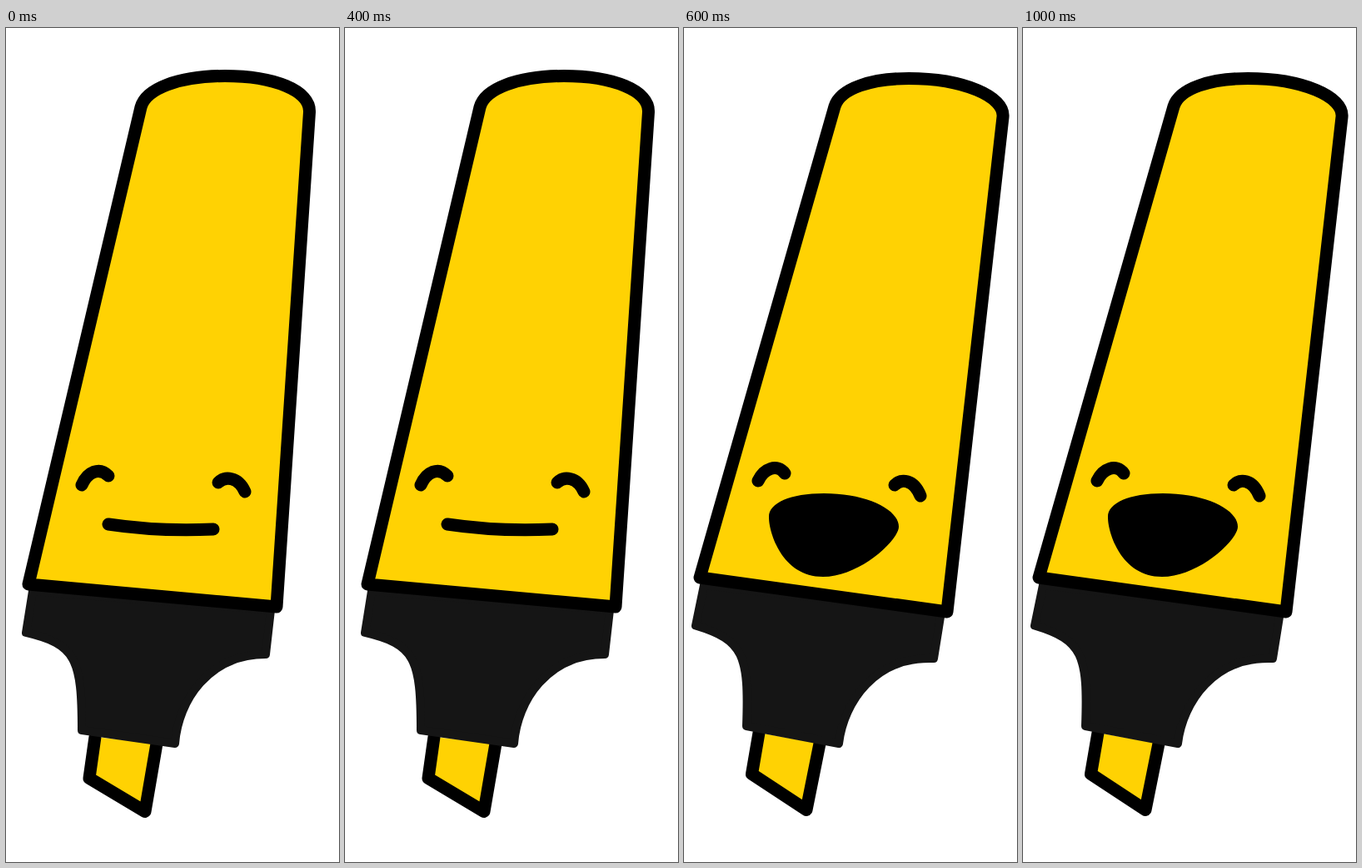
Animation, 400 px wide and 1000 px high, one loop 1200 ms. Source, as an HTML page:

```html
<!DOCTYPE html>
<html lang="en">
<head>
<meta charset="utf-8">
<title>Laughing highlighter</title>
<style>
html, body { margin: 0; width: 100%; height: 100%; overflow: hidden; background: #fff; }
svg { display: block; width: 400px; height: 1000px; }
path { stroke-width: 15; stroke-linecap: round; stroke-linejoin: round; }
.ink { fill: #ffd203; stroke: #000; }
.cap { fill: #151515; stroke: #151515; stroke-width: 10; }
.line { fill: none; stroke: #000; }
</style>
</head>
<body>
<svg viewBox="0 0 400 1000">
  <g id="smile">
    <path class="ink" d="M107 850L100 899.500L167 939.500L181 858"/>
    <path class="cap" d="M32 675L24 725C84 739 91 756 91 842L203 858C207 806 244 751 312 751L318 698Z"/>
    <path class="ink" d="M27 667L162 95C168 73 207 57.500 263 57.500C322 57.500 366 75 364.500 101L325 694Z"/>
    <path class="line" d="M91 548C98 532 112 526 123 537M255 545C263 537 279 538 287 556M123 595Q183 604 249 601"/>
  </g>
  <g id="laugh">
    <path class="ink" d="M90 845L81.500 894.500L147 937.500L163 858"/>
    <path class="cap" d="M24 668L14 716.500C72 734 78 752 75 837L186 858C192 808 230 753 300 756L309 700Z"/>
    <path class="ink" d="M19 659L181 94C188 72 226 60.500 270 60.500C335 60.500 386 82 383 107L316 700Z"/>
    <path class="line" d="M89 543C96 528 112 522 121 534M253 548C261 540 276 541 284 561"/>
    <path d="M102 587C101 570 127 558 168 558C219 558 258 577 258 598C258 614 211 658 167 658C118 658 102 605 102 587Z"/>
  </g>
</svg>
<script>
const HOLD = 200;
const poses = ["smile", "laugh"].map(id => document.getElementById(id));
const start = performance.now();

function draw(now) {
  const step = Math.floor(Math.max(0, now - start) / HOLD) % poses.length;
  poses.forEach((pose, i) => pose.style.display = i === step ? "" : "none");
  requestAnimationFrame(draw);
}
draw(start);
</script>
</body>
</html>
```
